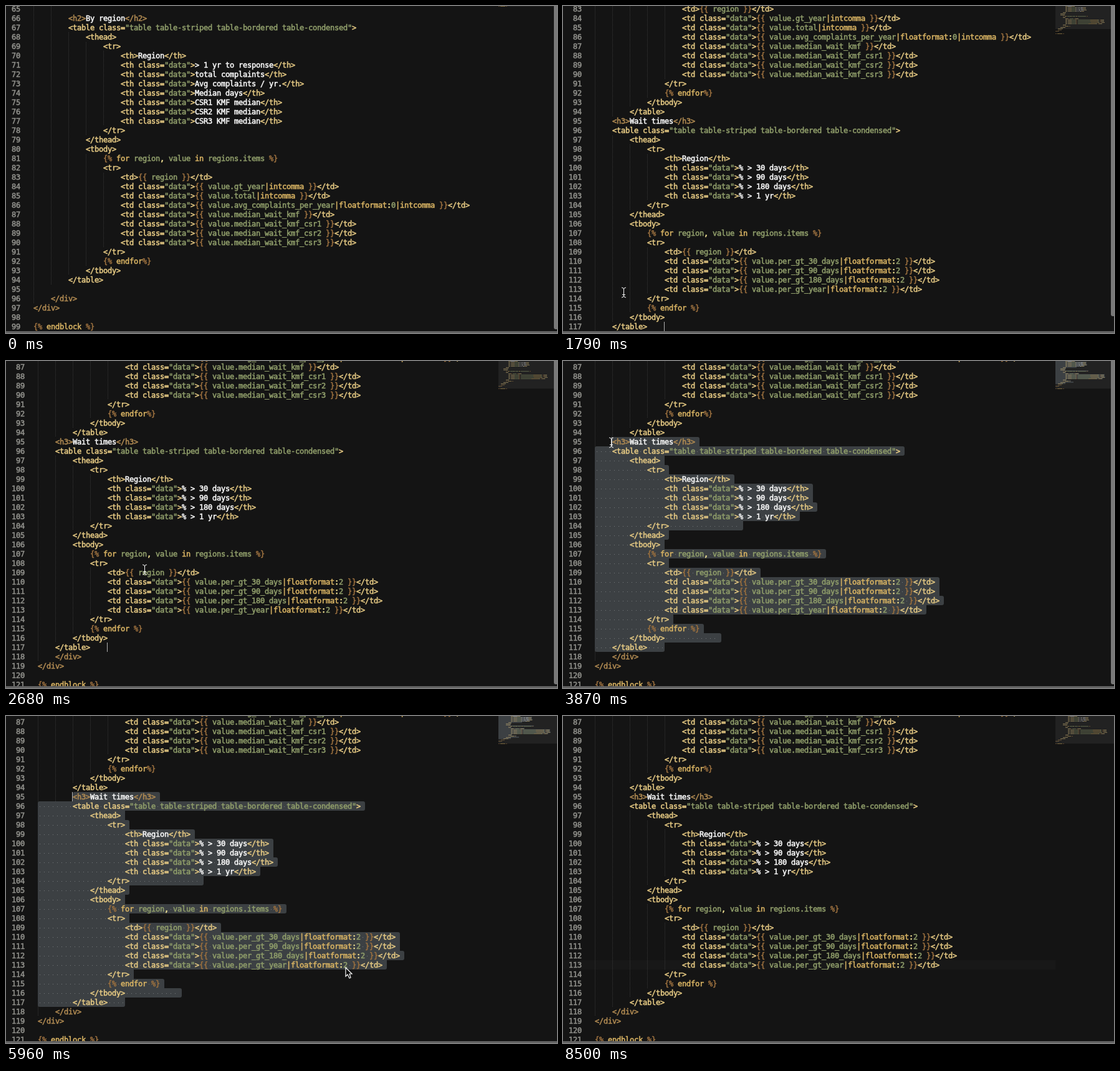
Recreate the animation shown at these times as an HTML page with a canvas. Size 884 by 525 pixels, loop 8.63 s.

```html
<!DOCTYPE html>
<html lang="en">
<head>
<meta charset="utf-8">
<title>Indenting a block</title>
<style>
html, body { margin: 0; width: 100%; height: 100%; overflow: hidden; background: #141414; }
canvas { display: block; }
</style>
</head>
<body>
<canvas id="stage" width="884" height="525"></canvas>
<script>
const ctx = document.getElementById('stage').getContext('2d');
const CELL = 7, ROW = 15, FIRST = 65, MAP_X = 790, FLOOR = 522;

// The loop is cut into equal steps; all moments below are step counts.
const LOOP = 8630, STEPS = 58;
const WAKE = 1, PASTE = 11, PRESS = 21, DROP = 26, INDENT = 32, CLICK = 46;
const BLINK = 7, BLINK_ON = 3;

const COLOR = {
  bg: '#141414', row: '#181818', number: '#8f8f8a', guide: '#363636',
  text: '#f8f8f8', tag: '#e5c983', block: '#b08a52', string: '#8f9d6a',
  brace: '#9b703f', word: '#d8b363', mark: '#f3e394',
  select: '#3c4043', dot: '#74787a', caret: '#b0b0b0',
  view: '#222222', thumb: '#787878', edge: '#626262'
};

// Document text
const pad = (n, s) => ' '.repeat(n) + s;
const th = (n, s) => pad(n, `<th class="data">${s}</th>`);
const td = (n, s) => pad(n, `<td class="data">{{ value.${s} }}</td>`);
const TABLE = '<table class="table table-striped table-bordered table-condensed">';
const LOOP_TAG = '{% for region, value in regions.items %}';

const upper = [
  pad(8, ''), pad(8, '<h2>By region</h2>'), pad(8, TABLE),
  pad(12, '<thead>'), pad(16, '<tr>'), pad(20, '<th>Region</th>'),
  ...['> 1 yr to response', 'total complaints', 'Avg complaints / yr.', 'Median days',
    'CSR1 KMF median', 'CSR2 KMF median', 'CSR3 KMF median'].map(s => th(20, s)),
  pad(16, '</tr>'), pad(12, '</thead>'), pad(12, '<tbody>'),
  pad(16, LOOP_TAG), pad(16, '<tr>'), pad(20, '<td>{{ region }}</td>'),
  ...['gt_year|intcomma', 'total|intcomma',
    'avg_complaints_per_year|floatformat:0|intcomma', 'median_wait_kmf',
    'median_wait_kmf_csr1', 'median_wait_kmf_csr2', 'median_wait_kmf_csr3'].map(s => td(20, s)),
  pad(16, '</tr>'), pad(16, '{% endfor%}'), pad(12, '</tbody>'), pad(8, '</table>')
];
const pasted = [
  pad(4, '<h3>Wait times</h3>'), pad(4, TABLE),
  pad(8, '<thead>'), pad(12, '<tr>'), pad(16, '<th>Region</th>'),
  ...['30 days', '90 days', '180 days', '1 yr'].map(s => th(16, '% > ' + s)),
  pad(12, '</tr>') + pad(16, ''), pad(8, '</thead>'), pad(8, '<tbody>'),
  pad(12, LOOP_TAG), pad(12, '<tr>'), pad(16, '<td>{{ region }}</td>'),
  ...['30_days', '90_days', '180_days', 'year'].map(s => td(16, `per_gt_${s}|floatformat:2`)),
  pad(12, '</tr>'), pad(12, '{% endfor %}'),
  pad(8, '</tbody>') + pad(12, ''), pad(4, '</table>') + pad(4, '')
];
const lower = [pad(4, '</div>'), '</div>', '', '{% endblock %}'];
const docs = [
  [...upper, pad(4, ''), ...lower],
  [...upper, ...pasted, ...lower],
  [...upper, ...pasted.map(s => pad(4, s)), ...lower]
];
const BLOCK_TOP = FIRST + upper.length, BLOCK_END = BLOCK_TOP + pasted.length - 1;

// Syntax colouring: a line becomes [column, text, colour] runs
function tokens(line) {
  const runs = [];
  for (const part of line.matchAll(/<[^>]*>|\{[{%].*?[%}]\}|[^<{]+/g)) {
    const s = part[0], add = (m, color) => runs.push([part.index + m.index, m[0], color]);
    if (s[0] === '<') {
      const base = /^<\/?(h\d|div)/.test(s) ? COLOR.block : COLOR.tag;
      for (const m of s.matchAll(/"[^"]*"|[^"]+/g)) add(m, m[0][0] === '"' ? COLOR.string : base);
    } else if (s[0] === '{') {
      const rule = /(\{[{%]|[%}]\})|(\b(?:for|in|endfor|endblock)\b|\||(?<=\|)\w+)|([:,])|\w[\w.]*/g;
      for (const m of s.matchAll(rule))
        add(m, m[1] ? COLOR.brace : m[2] ? COLOR.word : m[3] ? COLOR.mark : COLOR.string);
    } else if (s.trim()) {
      add({ 0: s, index: 0 }, COLOR.text);
    }
  }
  return runs;
}

// Motion: eased travel between a few [step, ...values] points
const SCROLL = [[10, 0], [12, 270], [13, 270], [16, 325]];
const SWEEP = [[4, 181, 172], [9, 97, 460], [13, 97, 460], [18, 222, 335],
  [PRESS, 165, 460], [DROP, 77, 131], [28, 293, 243]];
const RETURN = [[38, 717, 510], [40, 545, 404], [44, 622, 405], [49, 622, 405], [50, 664, 441]];

function along(keys, k) {
  const i = keys.findIndex(key => key[0] > k);
  if (i === 0) return keys[0].slice(1);
  if (i < 0) return keys[keys.length - 1].slice(1);
  const a = keys[i - 1], b = keys[i], p = (k - a[0]) / (b[0] - a[0]), e = p * p * (3 - 2 * p);
  return a.slice(1).map((v, j) => Math.round(v + (b[j + 1] - v) * e));
}
function pointerAt(k) {
  const path = [SWEEP, RETURN].find(p => k >= p[0][0] && k <= p[p.length - 1][0]);
  return path && along(path, k);
}
// Every action restarts the blink in its lit phase
function caretLit(k) {
  const start = [WAKE, PASTE, PRESS, DROP, INDENT, CLICK + 1].filter(s => s <= k).pop();
  return start !== undefined && (k - start) % BLINK < BLINK_ON;
}

function sceneAt(k) {
  const lines = docs[k < PASTE ? 0 : k < INDENT ? 1 : 2];
  const [scroll] = along(SCROLL, k);
  const numEnd = 9 + CELL * String(FIRST + lines.length - 1).length;
  const scene = { k, lines, scroll, numEnd, left: numEnd + 21, pointer: pointerAt(k) };
  const width = n => lines[n - FIRST].length;
  scene.top = n => 12 + (n - 66) * ROW - scroll;
  scene.lineAt = y => 66 + Math.floor((y + scroll - 12) / ROW);
  if (k < PASTE) scene.head = [BLOCK_TOP, 4];
  else if (k <= PRESS) scene.head = [BLOCK_END, width(BLOCK_END)];
  else if (k < DROP) {
    const [x, y] = scene.pointer;
    const n = Math.max(BLOCK_TOP, Math.min(BLOCK_END, scene.lineAt(y)));
    const col = Math.round((x - scene.left) / CELL);
    scene.head = [n, Math.max(0, Math.min(width(n), col))];
  } else if (k < CLICK) scene.head = [BLOCK_TOP, k < INDENT ? 4 : 8];
  else scene.head = [BLOCK_END - 4, width(BLOCK_END - 4)];

  // Selected columns of a line
  scene.span = n => {
    const [line, col] = scene.head;
    if (k <= PRESS || k >= CLICK || n < line || n > BLOCK_END) return null;
    return [n === line ? col : 0, width(n) + (n < BLOCK_END ? 1 : 0)];
  };
  return scene;
}

// Drawing
function box(x, y, w, h, color) {
  ctx.fillStyle = color;
  ctx.fillRect(x, y, w, h);
}
function write(s, x, y, color) {
  ctx.fillStyle = ctx.strokeStyle = color;
  ctx.lineWidth = .55;
  ctx.fillText(s, x, y);
  ctx.strokeText(s, x, y);
}

function drawSelection(scene, n) {
  const span = scene.span(n);
  if (!span) return;
  const prev = scene.span(n - 1), next = scene.span(n + 1), y = scene.top(n);
  const r = (other, side) => !other || (side ? other[1] < span[1] : other[0] > span[0]) ? 3 : 0;
  ctx.fillStyle = COLOR.select;
  ctx.beginPath();
  ctx.roundRect(scene.left + span[0] * CELL, y, (span[1] - span[0]) * CELL, ROW,
    [r(prev, 0), r(prev, 1), r(next, 1), r(next, 0)]);
  ctx.fill();
  const line = scene.lines[n - FIRST];
  for (let c = span[0]; c < line.length; c++)
    if (line[c] === ' ') box(scene.left + c * CELL + 3, y + 8, 1, 1, COLOR.dot);
}

function drawGuides(x, y, indent) {
  ctx.strokeStyle = COLOR.guide;
  ctx.lineWidth = 1;
  ctx.setLineDash([1, 1]);
  ctx.lineDashOffset = y & 1;
  for (let c = 0; c < indent; c += 4) {
    ctx.beginPath();
    ctx.moveTo(x + c * CELL + .5, y);
    ctx.lineTo(x + c * CELL + .5, y + ROW);
    ctx.stroke();
  }
  ctx.setLineDash([]);
}

function drawLine(scene, n) {
  const line = scene.lines[n - FIRST], y = scene.top(n), label = String(n);
  drawGuides(scene.left, y, line.search(/\S|$/));
  drawSelection(scene, n);
  write(label, scene.numEnd - label.length * CELL, y + 12, COLOR.number);
  for (const [col, s, color] of tokens(line)) write(s, scene.left + col * CELL, y + 12, color);
}

function drawMinimap(scene) {
  const mapY = n => (n - 99) * 2;
  box(MAP_X, 0, 94, mapY(66 + (FLOOR - 12 + scene.scroll) / ROW) - 1, COLOR.view);
  for (let n = 98; n < FIRST + scene.lines.length; n++) {
    const y = mapY(n), span = scene.span(n);
    if (span) box(MAP_X + span[0], y - 1, span[1] - span[0], 2, COLOR.select);
    ctx.globalAlpha = .5;
    for (const [col, s, color] of tokens(scene.lines[n - FIRST]))
      for (const m of s.matchAll(/\S+/g)) box(MAP_X + col + m.index, y, m[0].length, 1, color);
    ctx.globalAlpha = 1;
  }
}

// The thumb keeps its place in proportion to the document, then fades out
function drawScrollbar({ k, lines, scroll }) {
  const h = 34000 / lines.length;
  const end = FLOOR - 3 - (k < PASTE ? 0 : (325 - scroll) * .38);
  ctx.globalAlpha = Math.max(0, Math.min(1, (INDENT + 1 - k) / 2));
  ctx.fillStyle = COLOR.thumb;
  ctx.beginPath();
  ctx.roundRect(879, end - h, 7, h, 3);
  ctx.fill();
  ctx.globalAlpha = 1;
}

function drawArrow(x, y) {
  const shape = [[0, 0], [0, 14], [3, 11], [6, 17], [8, 16], [6, 10], [10, 10]];
  ctx.beginPath();
  for (const [dx, dy] of shape) ctx.lineTo(x + dx, y + dy);
  ctx.closePath();
  ctx.fillStyle = '#000';
  ctx.strokeStyle = '#fff';
  ctx.lineWidth = 1.2;
  ctx.fill();
  ctx.stroke();
}

function drawBeam(x, y) {
  ctx.strokeStyle = '#f4f4f4';
  ctx.lineWidth = 1;
  ctx.beginPath();
  ctx.moveTo(x + .5, y - 6);
  ctx.lineTo(x + .5, y + 6);
  for (const s of [-1, 1]) {
    ctx.moveTo(x - 3, y + 8 * s);
    ctx.quadraticCurveTo(x + .5, y + 8 * s, x + .5, y + 5 * s);
    ctx.quadraticCurveTo(x + .5, y + 8 * s, x + 4, y + 8 * s);
  }
  ctx.moveTo(x - 2, y + 3.5);
  ctx.lineTo(x + 3, y + 3.5);
  ctx.stroke();
}

function drawPointer(scene) {
  if (!scene.pointer) return;
  const [x, y] = scene.pointer;
  const span = scene.span(scene.lineAt(y));
  const over = span && x < scene.left + span[1] * CELL;
  if (y > 500 || (scene.k > INDENT && over)) drawArrow(x, y);
  else drawBeam(x, y);
}

function draw(k) {
  const scene = sceneAt(k), [line, col] = scene.head;
  box(0, 0, 884, 525, COLOR.bg);
  ctx.save();
  ctx.beginPath();
  ctx.rect(0, 0, 884, FLOOR);
  ctx.clip();
  if (k >= CLICK) box(0, scene.top(line), MAP_X, ROW, COLOR.row);

  ctx.font = '12px "DejaVu Sans Mono", monospace';
  ctx.letterSpacing = '0px';
  ctx.letterSpacing = (CELL - ctx.measureText('0').width) + 'px';
  for (let n = FIRST; n < FIRST + scene.lines.length; n++) {
    const y = scene.top(n);
    if (y > -ROW - 3 && y < FLOOR) drawLine(scene, n);
  }
  if (caretLit(k)) box(scene.left + col * CELL - 1, scene.top(line), 1, ROW, COLOR.caret);
  drawMinimap(scene);
  drawScrollbar(scene);
  ctx.restore();
  box(0, FLOOR, 884, 3, COLOR.edge);
  drawPointer(scene);
}

const began = performance.now();
let shown = -1;
function frame() {
  const t = (performance.now() - began) % LOOP;
  // A small lead absorbs rounding of the step times
  const k = Math.floor(t / LOOP * STEPS + .05) % STEPS;
  if (k !== shown) draw(shown = k);
  requestAnimationFrame(frame);
}
frame();
</script>
</body>
</html>
```
